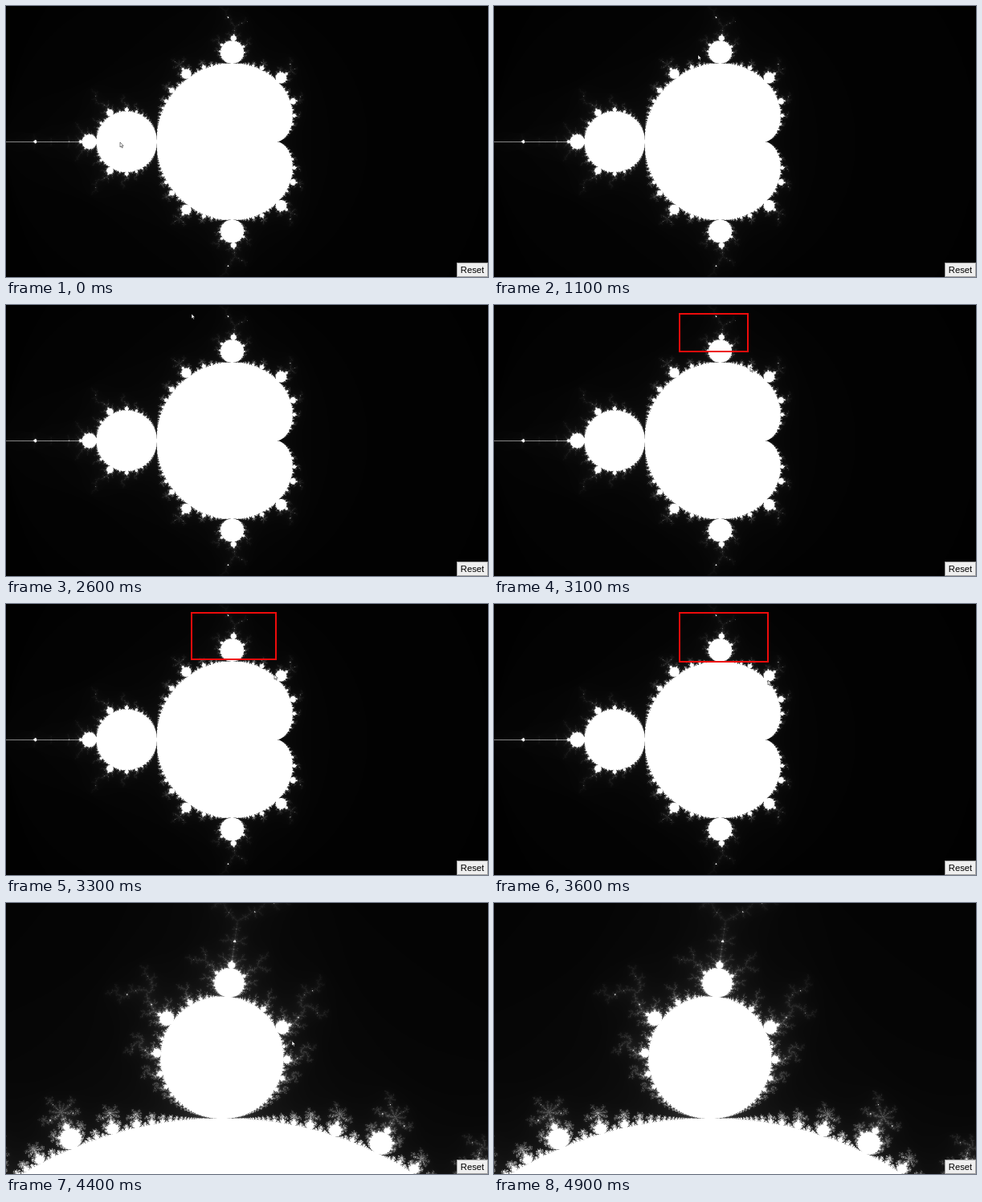
Recreate the animation shown at these times as an HTML page with a canvas. Size 600 by 338 pixels, loop 5000 ms.

```html
<!DOCTYPE html>
<html lang="en">
<head>
<meta charset="utf-8">
<title>Mandelbrot zoom</title>
<style>
  html, body { margin: 0; width: 100%; height: 100%; overflow: hidden; background: #000; }
  .stage { position: relative; width: 600px; height: 338px; overflow: hidden; }
  .stage > * { position: absolute; box-sizing: border-box; }
  canvas { left: 0; top: 0; }

  #zoomed { animation: swap 5s step-end infinite; }
  .box {
    left: 230px; top: 10px; aspect-ratio: 16 / 9;
    border: 2px solid #ee0b0b;
    animation: drag 5s step-end infinite;
  }
  .cursor {
    left: 0; top: 0; width: 6px; height: 9px; overflow: visible;
    animation: point 5s infinite;
  }
  .reset {
    left: 561px; top: 320px; width: 39px; height: 18px;
    border: 1px solid #a0a0a0; background: #efefef; color: #000;
    font: 11.3px/16px "Liberation Sans", Arial, sans-serif;
    text-align: center;
  }

  @keyframes swap {
    0% { opacity: 0; }
    88%, 100% { opacity: 1; }
  }
  @keyframes drag {
    0% { opacity: 0; width: 6px; }
    56% { opacity: 1; width: 6px; }
    58% { opacity: 1; width: 32px; }
    60% { opacity: 1; width: 64px; }
    62% { opacity: 1; width: 87px; }
    64% { opacity: 1; width: 98px; }
    66% { opacity: 1; width: 107px; }
    68% { opacity: 1; width: 110px; }
    72% { opacity: 1; width: 112px; }
    78% { opacity: 1; width: 113px; }
    84% { opacity: 1; width: 114px; }
    88%, 100% { opacity: 0; width: 114px; }
  }
  /* The pointer moves ten times a second. */
  @keyframes point {
    0% { transform: translate(142px, 170px); animation-timing-function: steps(3); }
    6% { transform: translate(246px, 247px); animation-timing-function: steps(3); }
    12% { transform: translate(228px, 165px); animation-timing-function: steps(1); }
    14%, 16% { transform: translate(230px, 166px); animation-timing-function: steps(3); }
    22% { transform: translate(254px, 61px); animation-timing-function: steps(3); }
    28% { transform: translate(258px, 39px); animation-timing-function: steps(6); }
    40% { transform: translate(250px, 19px); animation-timing-function: steps(6); }
    52%, 54% { transform: translate(231px, 11px); animation-timing-function: steps(1); }
    56% { transform: translate(231px, 9px); animation-timing-function: steps(3); }
    62% { transform: translate(319px, 77px); animation-timing-function: steps(2); }
    66% { transform: translate(334px, 88px); animation-timing-function: steps(3); }
    72% { transform: translate(341px, 95px); animation-timing-function: steps(3); }
    78% { transform: translate(344px, 124px); animation-timing-function: steps(3); }
    84%, 88% { transform: translate(356px, 172px); animation-timing-function: steps(1); }
    90%, 92% { transform: translate(357px, 171px); animation-timing-function: steps(3); }
    98%, 100% { transform: translate(345px, 171px); }
  }
</style>
</head>
<body>
<div class="stage">
  <canvas id="home" width="600" height="338"></canvas>
  <canvas id="zoomed" width="600" height="338"></canvas>
  <div class="box"></div>
  <div class="reset">Reset</div>
  <svg class="cursor" viewBox="0 0 6 9">
    <path d="M0 0V6L1.4 4.8 2.4 7 3.3 6.6 2.4 4.5 4.2 4.4Z" fill="#fff" stroke="#000" stroke-width=".5"/>
  </svg>
</div>
<script>
  const MAX = 255;

  // Escape count of c = a + bi, or MAX inside the set.
  function escape(a, b) {
    const b2 = b * b, p = a - 0.25, q = p * p + b2;
    if (q * (q + p) <= b2 / 4 || (a + 1) * (a + 1) + b2 <= 0.0625) return MAX;
    let x = 0, y = 0, xx = 0, yy = 0, n = 0;
    while (n < MAX && xx + yy <= 4) {
      y = 2 * x * y + b;
      x = xx - yy + a;
      xx = x * x;
      yy = y * y;
      n++;
    }
    return n;
  }

  // Grey level follows the escape count, averaged over 2 x 2 samples.
  function render(id, left, top, scale) {
    const canvas = document.getElementById(id);
    const ctx = canvas.getContext("2d");
    const { width, height } = canvas;
    const image = ctx.createImageData(width, height);
    const half = 0.5 / scale;
    for (let y = 0, i = 0; y < height; y++) {
      const b = top - y / scale;
      for (let x = 0; x < width; x++, i += 4) {
        const a = left + x / scale;
        const sum = escape(a, b) + escape(a + half, b) +
          escape(a, b - half) + escape(a + half, b - half);
        image.data.fill(sum / 4, i, i + 3);
        image.data[i + 3] = 255;
      }
    }
    ctx.putImageData(image, 0, 0);
  }

  render("home", -2, 169 / 150, 150);
  render("zoomed", -0.4593, 0.9838, 803.6);
</script>
</body>
</html>
```
